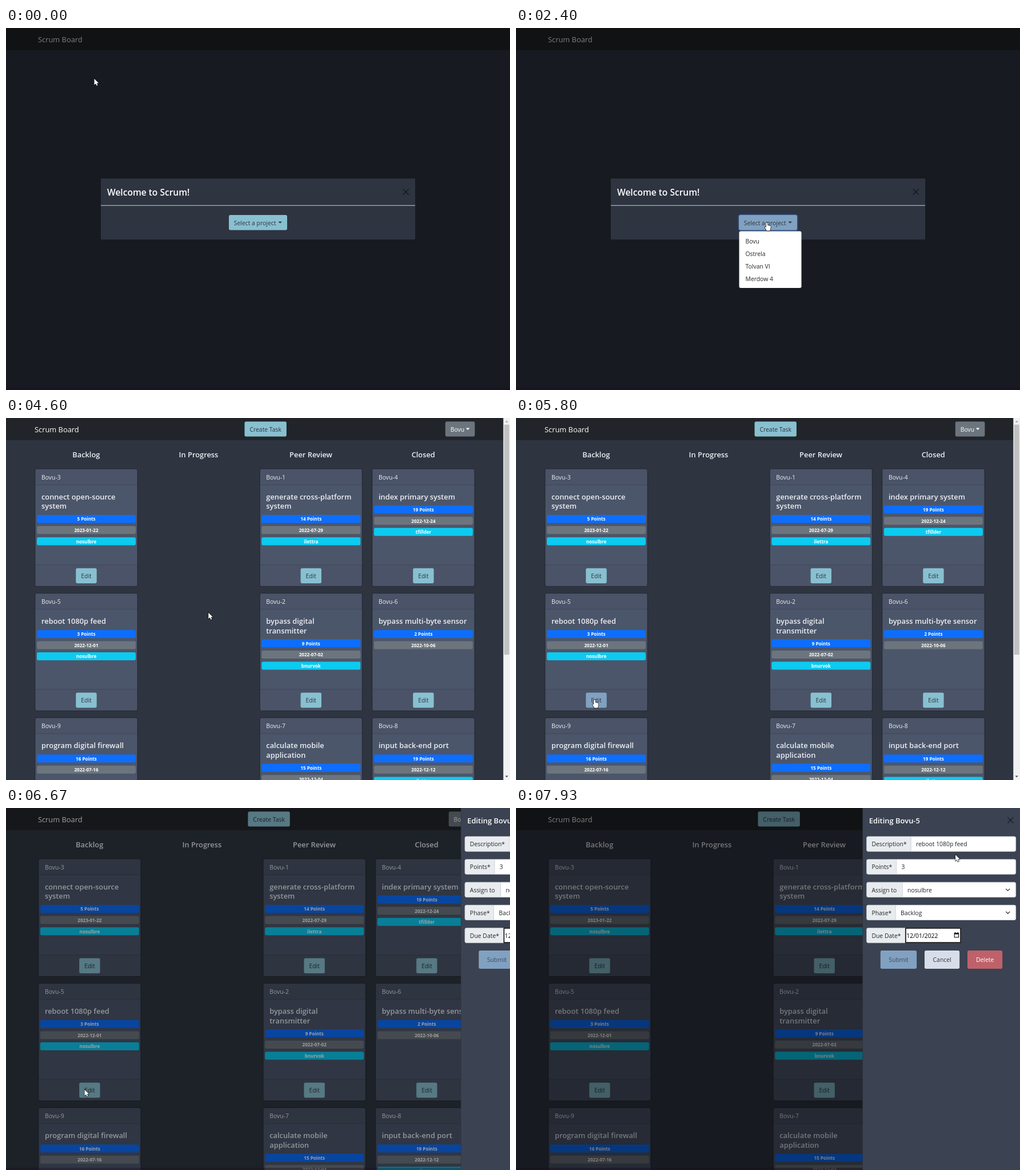
These frames come from a looping animation (882 by 635 pixels, 8 s). An HTML page with a canvas:

```html
<!DOCTYPE html>
<html lang="en">
<head>
<meta charset="utf-8">
<title>Scrum Board</title>
<style>
html, body { margin: 0; width: 100%; height: 100%; overflow: hidden; background: #17191f; }
canvas { display: block; width: 882px; height: 635px; }
</style>
</head>
<body>
<canvas id="stage" width="882" height="635"></canvas>
<script>
const ctx = document.getElementById('stage').getContext('2d');
const W = 882, H = 635, LOOP = 8000, STEP = 200 / 3;
const FONT = '"Open Sans", "Noto Sans", sans-serif';
const BODY = 10.4, HEAD = 12.85;
const C = {
  page: '#2e3440', nav: '#212529', card: '#4c566a', panel: '#3b4252', ice: '#88c0d0',
  steel: '#81a1c1', blue: '#0d6efd', gray: '#6c757d', cyan: '#0dcaf0', ink: '#212529'
};
const PROJECT = 'Bovu';
const PROJECTS = [PROJECT, 'Ostrela', 'Tolvan VI', 'Merdow 4'];
const COLUMNS = [
  ['Backlog', [
    [3, ['connect open-source', 'system'], 5, '2023-01-22', 'nosulbre'],
    [5, ['reboot 1080p feed'], 3, '2022-12-01', 'nosulbre'],
    [9, ['program digital firewall'], 16, '2022-07-16']]],
  ['In Progress', []],
  ['Peer Review', [
    [1, ['generate cross-platform', 'system'], 14, '2022-07-29', 'ilettra'],
    [2, ['bypass digital', 'transmitter'], 9, '2022-07-02', 'bnurvok'],
    [7, ['calculate mobile', 'application'], 15, '2022-12-04']]],
  ['Closed', [
    [4, ['index primary system'], 19, '2022-12-24', 'tfillder'],
    [6, ['bypass multi-byte sensor'], 2, '2022-10-06'],
    [8, ['input back-end port'], 19, '2022-12-12', 'ilettra']]]
];

const clamp = v => Math.max(0, Math.min(1, v));
const linear = s => s;
const smooth = s => s * s * (3 - 2 * s);
const speedUp = s => Math.pow(s, 1.4);
const slowDown = s => 1 - Math.pow(1 - s, 1.5);

// Pointer moves: start, end, easing, from, control, to
const MOVES = [
  [0, 200, linear, [154.5, 89], [160, 95], [165.5, 102]],
  [400, 1070, smooth, [165.5, 102], [302, 222], [439, 341]],
  [2470, 3130, smooth, [439, 341], [438, 358], [432, 373]],
  [4333, 4800, speedUp, [432, 373], [347, 338.5], [262, 304]],
  [4800, 5200, slowDown, [262, 304], [185, 312], [162, 406]],
  [5200, 5730, smooth, [162, 406], [166, 450], [137.5, 494]],
  [6870, 7330, speedUp, [137.5, 494], [200, 490], [251, 468]],
  [7330, 7870, smooth, [251, 468], [540, 270], [781, 90]],
  [7870, 7930, linear, [781, 90], [776, 84], [769, 82]]
];

function pointerAt(t) {
  const [t0, t1, ease, a, b, c] = MOVES.filter(m => m[0] <= t).pop();
  const s = ease(clamp((t - t0) / (t1 - t0))), r = 1 - s;
  return [0, 1].map(i => r * r * a[i] + 2 * r * s * b[i] + s * s * c[i]);
}

function rect(x, y, w, h, fill) {
  ctx.fillStyle = fill;
  ctx.fillRect(x, y, w, h);
}

function box(x, y, w, h, fill, radii = 2.75, stroke) {
  ctx.beginPath();
  ctx.roundRect(x, y, w, h, radii);
  ctx.fillStyle = fill;
  ctx.fill();
  if (stroke) {
    ctx.strokeStyle = stroke;
    ctx.lineWidth = 0.7;
    ctx.stroke();
  }
}

// y is the middle of the capital letters
function text(str, x, y, color, size = BODY, weight = 400, align = 'left') {
  ctx.font = `${weight} ${size}px ${FONT}`;
  ctx.textAlign = align;
  ctx.fillStyle = color;
  ctx.fillText(str, x, y + size * 0.357);
}

function shape(points, fill) {
  ctx.beginPath();
  points.forEach(p => ctx.lineTo(...p));
  ctx.closePath();
  ctx.fillStyle = fill;
  ctx.fill();
}

const caret = (x, y, color) => shape([[x, y], [x + 6.6, y], [x + 3.3, y + 3.3]], color);

function button(str, x, y, w, h, fill, color) {
  box(x, y, w, h, fill);
  text(str, x + w / 2, y + h / 2 + 0.5, color, BODY, 400, 'center');
}

function line(points, color, width) {
  ctx.beginPath();
  points.forEach(p => ctx.lineTo(...p));
  ctx.strokeStyle = color;
  ctx.lineWidth = width;
  ctx.stroke();
}

function cross(x, y) {
  const r = 5;
  line([[x - r, y - r], [x + r, y + r]], 'rgba(0,0,0,.55)', 1.3);
  line([[x - r, y + r], [x + r, y - r]], 'rgba(0,0,0,.55)', 1.3);
}

function navBar(dx) {
  rect(0, 0, W, 38.7, C.nav);
  text('Scrum Board', 50 + dx, 20.2, '#fff', 12.85);
}

function backdrop(alpha) {
  rect(0, 0, W, H, `rgba(0,0,0,${alpha})`);
  rect(0, 631, W, 4, `rgba(28,12,36,${alpha})`);
}

function card(x, y, [id, title, points, date, user], hover) {
  box(x, y, 179, 206, C.card, 2.75, 'rgba(0,0,0,.5)');
  rect(x, y, 179, 28, 'rgba(0,0,0,.03)');
  rect(x, y + 27.6, 179, 0.8, 'rgba(0,0,0,.2)');
  rect(x, y + 168, 179, 38, 'rgba(0,0,0,.03)');
  rect(x, y + 168, 179, 0.8, 'rgba(0,0,0,.2)');
  text(`${PROJECT}-${id}`, x + 11, y + 14.5, '#eceff4');
  title.forEach((row, i) => text(row, x + 11, y + 49 + i * 16.5, '#eceff4', HEAD, 600));
  const badges = [[`${points} Points`, C.blue], [date, C.gray], [user, C.cyan]];
  badges.forEach(([label, color], i) => {
    if (!label) return;
    const by = y + 54.9 + title.length * 16.4 + i * 19.6;
    box(x + 3, by - 7, 173, 14, color);
    text(label, x + 89.5, by + 0.5, '#fff', 8.1, 700, 'center');
  });
  button('Edit', x + 71.3, y + 174.2, 36.4, 26.4, hover ? C.steel : C.ice, C.page);
}

function board(dx, hoverEdit) {
  rect(0, 0, W, H, C.page);
  navBar(dx);
  button('Create Task', 417.5 + dx, 6.2, 73.4, 26.4, C.ice, C.page);
  box(768.8 + dx, 6.2, 51.6, 26.4, C.gray);
  text(PROJECT, 777.7 + dx, 20, '#fff');
  caret(804.8 + dx, 17.6, '#fff');
  COLUMNS.forEach(([name, cards], i) => {
    const x = 51 + dx + i * 196.65;
    text(name, x + 89.3, 64.6, '#eceff4', HEAD, 600, 'center');
    cards.forEach((data, j) => card(x, 89.3 + j * 218.3, data, hoverEdit && data[0] === 5));
  });
}

function scrollBar() {
  rect(870.3, 0, 11.7, H, '#f1f1f1');
  rect(871.7, 11.7, 9, 403.5, '#c1c1c1');
  shape([[873.5, 7.5], [878.9, 7.5], [876.2, 4.6]], '#a3a3a3');
  shape([[873.5, 627.5], [878.9, 627.5], [876.2, 630.4]], '#505050');
}

function welcome(t, [px, py]) {
  rect(0, 0, W, H, C.page);
  navBar(6);
  backdrop(0.5);
  rect(166, 264, 550, 107, C.page);
  rect(166, 310.8, 550, 0.9, '#dee2e6');
  text('Welcome to Scrum!', 177, 288.8, '#fff', 15.55, 600);
  cross(699.7, 287.5);

  const open = t >= 2395, pressed = t >= 3660;
  const hover = px > 390 && px < 492 && py > 328 && py < 355;
  const active = open && !hover;
  if (open && !pressed) {
    const k = clamp((t - 2310) / 150), g = 2.75 * k;
    box(390 - g, 328 - g, 102 + 2 * g, 26.5 + 2 * g, `rgba(49,132,253,${0.5 * k})`, 2.75 + g);
  }
  const ink = active ? '#fff' : C.page;
  box(390, 328, 102, 26.5, active ? '#0a58ca' : hover ? C.steel : C.ice);
  text('Select a project', 398.8, 342, ink);
  caret(476.4, 339.4, ink);
  if (!open) return;

  box(390.5, 356.5, 109, 99.5, '#fff');
  const onItem = py > 362;
  if (onItem) rect(390.5, 362, 109, 22.2, pressed ? C.blue : '#e9ecef');
  PROJECTS.forEach((name, i) =>
    text(name, 401.5, 374 + i * 22.1, pressed && i === 0 ? '#fff' : C.ink));
}

function statusBubble(t) {
  const alpha = Math.min(clamp((t - 3150) / 180), clamp((4200 - t) / 200));
  if (!alpha) return;
  ctx.globalAlpha = alpha;
  box(-1, 620.5, 69, 16, '#dee1e6', [0, 2.5, 0, 0]);
  text('localhost:3000/#', 3, 628.3, '#3c4043', 7.8);
  ctx.globalAlpha = 1;
}

function field(y, label, labelW, value, isSelect) {
  box(7.2, y, labelW, 26.2, '#e9ecef', [2.75, 0, 0, 2.75], '#ced4da');
  text(label, 16, y + 13.6, C.ink);
  if (!value) return;
  const x = 7.2 + labelW;
  box(x, y, 268.3 - x, 26.2, '#fff', [0, 2.75, 2.75, 0], '#ced4da');
  text(value, x + 8.8, y + 13.6, C.ink);
  if (isSelect) line([[250.8, y + 11.5], [254.3, y + 15], [257.8, y + 11.5]], '#343a40', 1.3);
}

function editPanel(left) {
  ctx.save();
  ctx.translate(left, 0);
  rect(0, 0, 276, H, C.panel);
  rect(0, 0, 0.7, H, 'rgba(0,0,0,.2)');
  text(`Editing ${PROJECT}-5`, 11.3, 22.5, '#fff', 12.95, 600);
  cross(259, 21.5);
  field(50, 'Description*', 77.6, 'reboot 1080p feed');
  field(90.1, 'Points*', 52, '3');
  field(130.2, 'Assign to', 62.6, 'nosulbre', true);
  field(170.3, 'Phase*', 50.6, 'Backlog', true);
  field(210.4, 'Due Date*', 67.3);
  rect(75, 210.3, 97.2, 26.3, '#101010');
  rect(76.4, 211.7, 94.4, 23.5, '#fff');
  text('12/01/2022', 76.9, 224, '#000');
  rect(160.3, 219, 8.4, 8.4, '#111');
  rect(161.4, 221.6, 6.2, 4.7, '#fff');
  rect(161.4, 217.9, 1.3, 2, '#111');
  rect(166.3, 217.9, 1.3, 2, '#111');
  button('Submit', 31.4, 250, 63.4, 32, C.steel, '#3f4a5e');
  button('Cancel', 108.6, 250, 61.2, 32, '#d8dee9', C.page);
  button('Delete', 183.6, 250, 61.2, 32, '#bf616a', '#fff');
  ctx.restore();
}

const ARROW = new Path2D('M0 0V10.9L2.6 8.5 4.2 12.3 6 11.5 4.4 7.8H7.8Z');
const HAND = new Path2D('M-1.3 1Q0 -.6 1.3 1V4.8L5.7 6Q7 6.4 6.9 8L6.2 12 5.5 14.6H-.7L-1.2 12.8 -3.5 9Q-3.4 7.3 -2.1 7.9L-1.3 8.8Z');

function pointer([x, y], isHand) {
  const path = isHand ? HAND : ARROW;
  ctx.save();
  ctx.translate(x, y);
  ctx.lineJoin = 'round';
  ctx.strokeStyle = '#000';
  ctx.lineWidth = 1.3;
  ctx.stroke(path);
  ctx.fillStyle = '#fff';
  ctx.fill(path);
  ctx.restore();
}

function render(t) {
  const pos = pointerAt(t), [px, py] = pos;
  const slideStart = 6555;
  let isHand;
  if (t < 3795) {
    welcome(t, pos);
    isHand = t < 3725 && px > 390 && (py > 362 || (py > 328 && py < 355));
  } else if (t < slideStart) {
    isHand = px > 122 && px < 158 && py > 481 && py < 508;
    board(0, isHand);
    scrollBar();
  } else {
    board(5.9, false);
    backdrop(0.5 * clamp((t - slideStart) / 150));
    editPanel(606.4 + 275.6 * (1 - smooth(clamp((t - slideStart) / 300))));
  }
  statusBubble(t);
  pointer(pos, isHand);
}

function tick(now) {
  const step = Math.floor((now % LOOP + 4) / STEP) % 120;
  render(step * STEP);
  requestAnimationFrame(tick);
}
requestAnimationFrame(tick);
</script>
</body>
</html>
```
